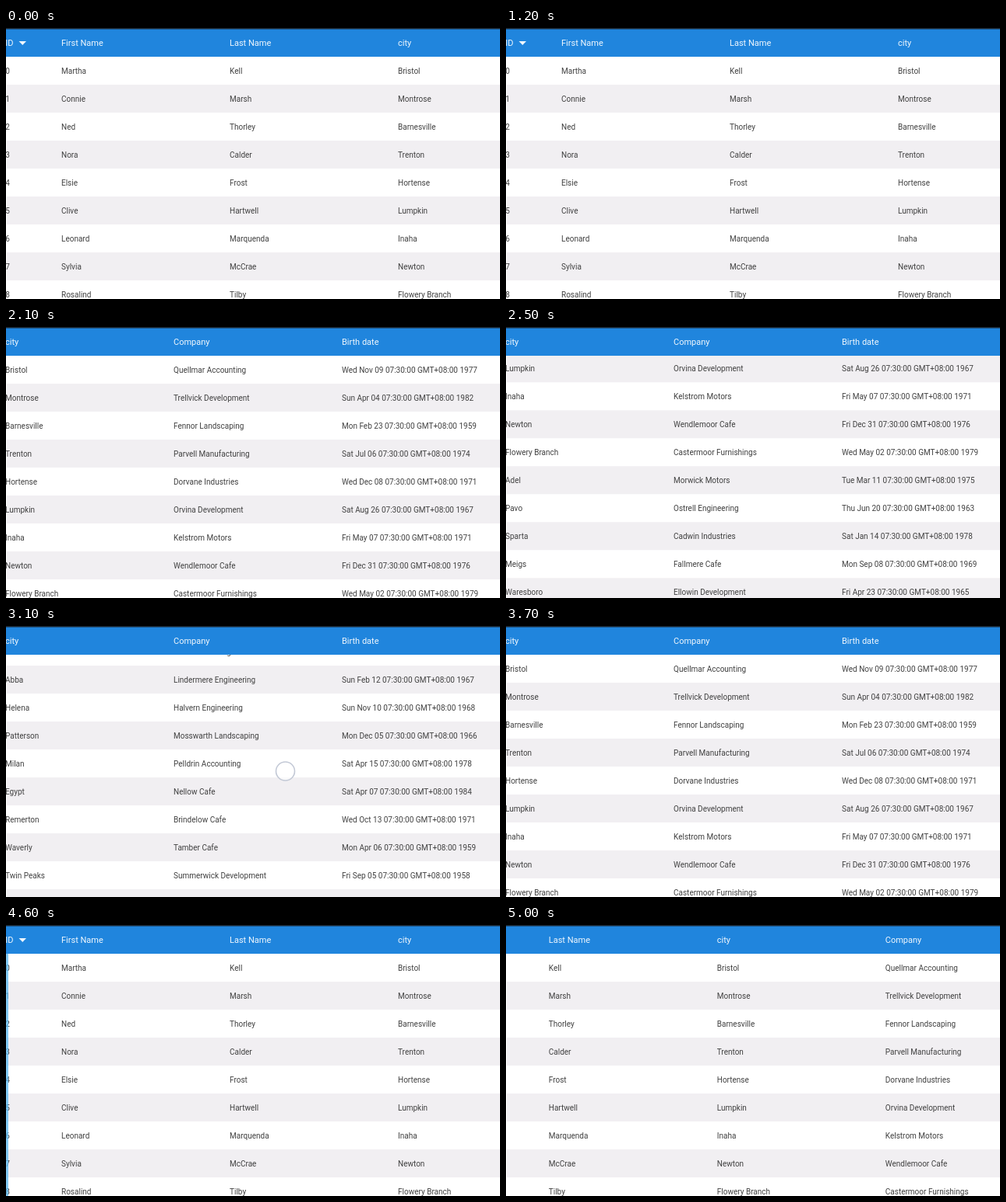
These frames come from a looping animation (634 by 349 pixels, 5100 ms). An HTML page with a canvas:

```html
<!DOCTYPE html>
<html lang="en">
<head>
<meta charset="utf-8">
<title>Scrolling data grid</title>
<style>
html, body { margin: 0; width: 100%; height: 100%; overflow: hidden; background: #fff; }
canvas { display: block; }
</style>
</head>
<body>
<canvas id="grid" width="634" height="349"></canvas>
<script>
const W = 634, H = 349, LOOP = 5100, STEP = 100;
const HEADER = 37, ROW = 36;
const MAX_X = 504, MAX_Y = 526;
const ctx = document.getElementById('grid').getContext('2d');

const columns = [
  { title: 'ID', x: -0.7 },
  { title: 'First Name', x: 71 },
  { title: 'Last Name', x: 287 },
  { title: 'city', x: 503 },
  { title: 'Company', x: 719 },
  { title: 'Birth date', x: 935 }
];

// First name | last name | city | company | birth date
const rows = `
Martha|Kell|Bristol|Quellmar Accounting|Wed Nov 09 1977
Connie|Marsh|Montrose|Trellvick Development|Sun Apr 04 1982
Ned|Thorley|Barnesville|Fennor Landscaping|Mon Feb 23 1959
Nora|Calder|Trenton|Parvell Manufacturing|Sat Jul 06 1974
Elsie|Frost|Hortense|Dorvane Industries|Wed Dec 08 1971
Clive|Hartwell|Lumpkin|Orvina Development|Sat Aug 26 1967
Leonard|Marquenda|Inaha|Kelstrom Motors|Fri May 07 1971
Sylvia|McCrae|Newton|Wendlemoor Cafe|Fri Dec 31 1976
Rosalind|Tilby|Flowery Branch|Castermoor Furnishings|Wed May 02 1979
||Adel|Morwick Motors|Tue Mar 11 1975
||Pavo|Ostrell Engineering|Thu Jun 20 1963
||Sparta|Cadwin Industries|Sat Jan 14 1978
||Meigs|Fallmere Cafe|Mon Sep 08 1969
||Waresboro|Ellowin Development|Fri Apr 23 1965
||Cordele|Torvane Welding|Wed Oct 18 1972
||Abba|Lindermere Engineering|Sun Feb 12 1967
||Helena|Halvern Engineering|Sun Nov 10 1968
||Patterson|Mosswarth Landscaping|Mon Dec 05 1966
||Milan|Pelldrin Accounting|Sat Apr 15 1978
||Egypt|Nellow Cafe|Sat Apr 07 1984
||Remerton|Brindelow Cafe|Wed Oct 13 1971
||Waverly|Tamber Cafe|Mon Apr 06 1959
||Twin Peaks|Summerwick Development|Fri Sep 05 1958
||Nashville|Pollmere Motors|Tue Aug 16 1960`.trim().split('\n').map((line, id) => {
  const cells = [String(id), ...line.split('|')];
  cells[5] = cells[5].replace(/ (\d{4})$/, ' 07:30:00 GMT+08:00 $1');
  return cells;
});

// Eased progress from 0 to 1 between two times
function ease(t, start, end) {
  const p = Math.min(1, Math.max(0, (t - start) / (end - start)));
  return (1 - Math.cos(Math.PI * p)) / 2;
}

const scrollX = t =>
  MAX_X * (ease(t, 1410, 1960) - ease(t, 3900, 4500) + ease(t, 4810, 5210));

const scrollY = t => MAX_Y * (ease(t, 2300, 2800) - ease(t, 3100, 3600));

function drawRows(sx, sy) {
  ctx.font = '10px Roboto, sans-serif';
  const first = Math.floor(sy / ROW);
  const last = Math.min(rows.length, Math.ceil((sy + H - HEADER) / ROW));
  for (let i = first; i < last; i++) {
    const top = HEADER + i * ROW - sy;
    if (i % 2) {
      ctx.fillStyle = '#f1eff2';
      ctx.fillRect(1, top, W, ROW);
    }
    ctx.fillStyle = '#404040';
    columns.forEach((col, c) => ctx.fillText(rows[i][c], col.x - sx, top + 22));
  }
}

function drawHeader(sx) {
  ctx.fillStyle = '#2085dd';
  ctx.fillRect(0, 0, W, HEADER);
  ctx.fillStyle = '#1b2530';
  ctx.fillRect(0, 0, W, 1.5);
  ctx.fillStyle = '#f0f7fd';
  ctx.font = '11px Roboto, sans-serif';
  columns.forEach(col => ctx.fillText(col.title, col.x - sx, 23.3));
  ctx.beginPath();
  ctx.moveTo(16.5 - sx, 17);
  ctx.lineTo(26 - sx, 17);
  ctx.lineTo(21.25 - sx, 22);
  ctx.fill();
}

function drawEdgeGlow(t) {
  if (t < 4500 || t > 4700) return;
  ctx.fillStyle = `rgba(90, 185, 240, ${t > 4600 ? 0.35 : 0.75})`;
  ctx.fillRect(0, HEADER, t > 4600 ? 2 : 3, H - HEADER);
}

function drawTouch(t, sy) {
  if (t < 3100 || t > 3200) return;
  ctx.beginPath();
  ctx.arc(358.5, 187 + MAX_Y - sy, 12, 0, Math.PI * 2);
  ctx.fillStyle = 'rgba(255, 255, 255, 0.6)';
  ctx.fill();
  ctx.strokeStyle = '#c3c9d6';
  ctx.lineWidth = 1.6;
  ctx.stroke();
}

function draw() {
  const t = Math.floor((performance.now() % LOOP) / STEP) * STEP;
  const sx = scrollX(t), sy = scrollY(t);
  ctx.fillStyle = '#fff';
  ctx.fillRect(0, 0, W, H);
  drawRows(sx, sy);
  drawHeader(sx);
  drawEdgeGlow(t);
  drawTouch(t, sy);
  requestAnimationFrame(draw);
}
draw();
</script>
</body>
</html>
```
